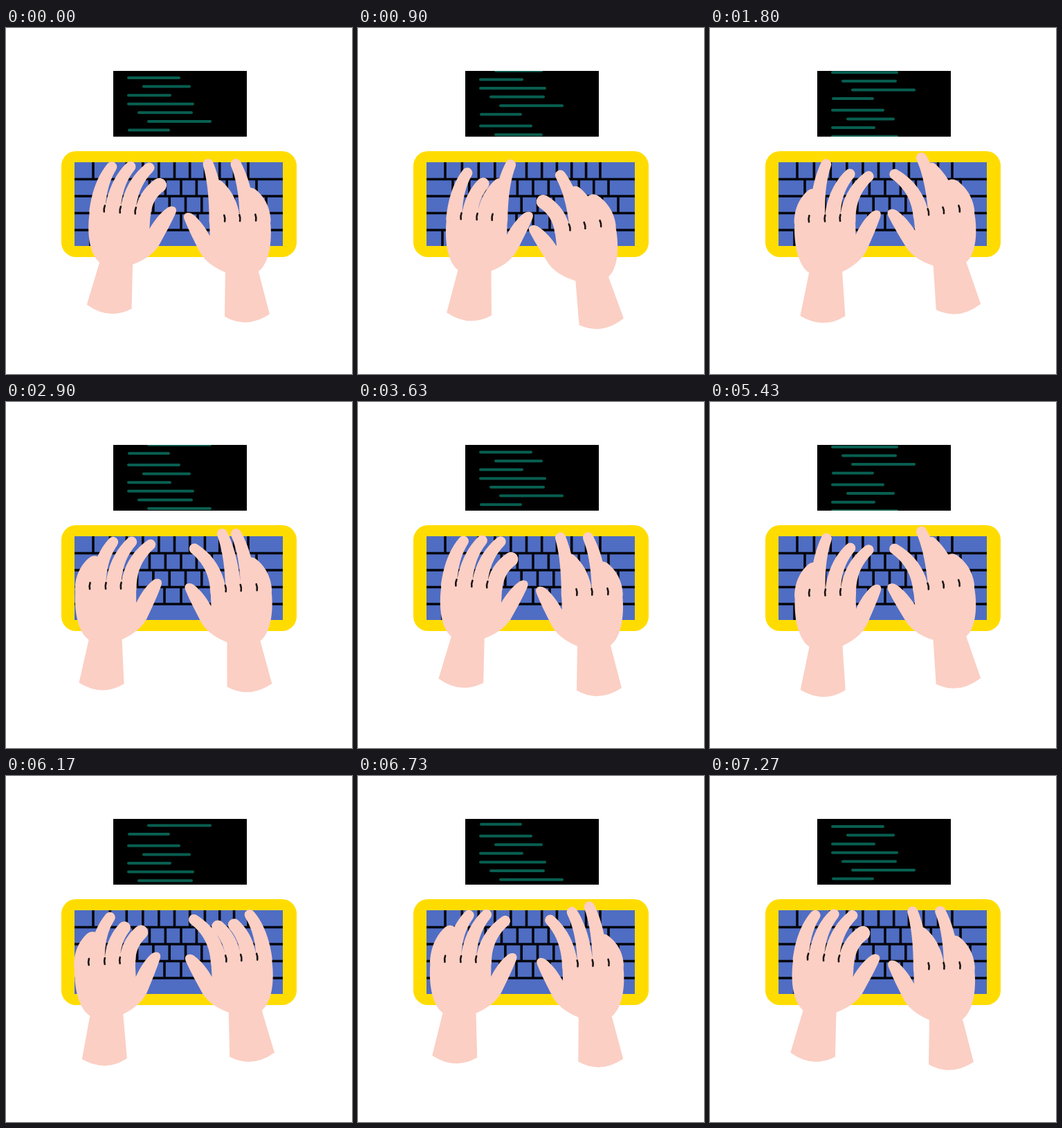
Recreate the animation shown at these times as an HTML page. Size 500 px wide and 500 px high, loop 7.31 s.

```html
<!DOCTYPE html>
<html lang="en">
<head>
<meta charset="utf-8">
<title>Typing hands</title>
<style>
  html, body { margin: 0; width: 100%; height: 100%; overflow: hidden; background: #fff; }
  svg { display: block; width: 100%; height: 100%; }
</style>
</head>
<body>
<svg id="stage" viewBox="0 0 500 500">
  <clipPath id="screen"><rect x="155" y="62" width="193" height="95"/></clipPath>
  <rect x="155" y="62" width="193" height="95"/>
  <g clip-path="url(#screen)">
    <path id="code" fill="none" stroke="#085f50" stroke-width="4" stroke-linecap="round"/>
  </g>
  <rect x="80" y="178" width="340" height="153" rx="21" fill="#ffdc00"/>
  <rect x="99" y="194" width="301" height="121" fill="#4f6dc3"/>
  <path id="gaps" fill="none" stroke="#05060c" stroke-width="3.6"/>
</svg>
<script>
const PERIOD = 3655;
const CODE_HEIGHT = 92.4;
const CODE_LINES = [[177, 250], [199, 265], [177, 237], [177, 270], [192, 268], [206, 295], [178, 235]];

// Gaps between keys per row; keys narrow slightly along a row.
const KEY_ROWS = [
  { first: 126, pitch: 24.6, narrowing: 0.22, count: 11 },
  { first: 137, pitch: 23.9, narrowing: 0.14, count: 11 },
  { first: 143, pitch: 23.3, narrowing: 0, count: 11 },
  { first: 205, pitch: 24, narrowing: 0, count: 4 },
  { first: 122, pitch: 0, narrowing: 0, count: 1 }
];

// Knuckle place, tilt, and what each finger does from pinky to index:
// "+" reaches, "-" curls, "." rests.
const BEATS = [0, 0.278, 0.492, 0.688, 0.793];
const LEFT = [
  [165, 262.5, 3.6, '+..-'], [172, 273.5, 1.4, '+--+'], [166, 275, -1.6, '.+..'],
  [142.5, 267.5, -2.8, '..--'], [144, 265.5, -0.4, '....']
];
const RIGHT = [
  [338, 274.5, 1.4, '.+-+'], [327.5, 285, 7.3, '.-+-'], [337.5, 263.5, 5.9, '..+.'],
  [340, 262.5, 3.5, '+--.'], [339.5, 268.5, 2.2, '.++.']
];
const REACH = [36, 67, 67, 63];
const LIFT = [29, 15, 16, 20];
const SKIN = '#fbcfc4';
const PALM = 'M-44 8C-46 38-40 67-25 78L-39.5 140Q-6 161 25.5 142L23 78' +
  'C43 69 55 58 61 44C67 31 74 17 80 1C84-9 75-12 68-7C58 1 50 13 44 25L44 0L-42 0Z';

const stage = document.getElementById('stage');
const code = document.getElementById('code');

function add(parent, name, attrs) {
  const node = document.createElementNS('http://www.w3.org/2000/svg', name);
  for (const key in attrs) node.setAttribute(key, attrs[key]);
  return parent.appendChild(node);
}

function makeHand(keys, side) {
  const group = add(stage, 'g', {});
  const fingers = add(group, 'path', { fill: SKIN });
  add(group, 'path', { d: PALM, fill: SKIN });
  add(group, 'path', {
    d: [-23, 0, 22].map(x => `M${x + 0.6}-4.5Q${x - 1} 0 ${x} 4.5`).join(''),
    fill: 'none', stroke: '#1a1414', 'stroke-width': 2.6, 'stroke-linecap': 'round'
  });
  const poses = keys.map(([x, y, tilt, action]) =>
    [x, y, tilt, ...[...action].map(sign => '-.+'.indexOf(sign) - 1)]);
  return { poses, side, group, fingers };
}

// Smooth cyclic interpolation through the poses.
function poseAt(poses, phase) {
  const n = BEATS.length;
  const beat = k => BEATS[(k + n) % n] + Math.floor(k / n);
  const pose = k => poses[(k + n) % n];
  let k = n - 1;
  while (BEATS[k] > phase) k--;
  const span = beat(k + 1) - beat(k);
  const u = (phase - beat(k)) / span, u2 = u * u, u3 = u2 * u;
  const slope = (j, i) => (pose(j + 1)[i] - pose(j - 1)[i]) / (beat(j + 1) - beat(j - 1)) * span;
  return pose(k).map((from, i) =>
    from * (2 * u3 - 3 * u2 + 1) + pose(k + 1)[i] * (3 * u2 - 2 * u3) +
    slope(k, i) * (u3 - 2 * u2 + u) + slope(k + 1, i) * (u3 - u2));
}

// Tapered finger that leaves the knuckle upright; short ones look fatter.
function fingerPath(level, index) {
  const bx = -33 + 22 * index, by = 4;
  const reach = REACH[index] + level * LIFT[index];
  const dx = 17 + 5 * index * (1 - 1.05 * Math.abs(level) - 0.35 * level);
  const baseR = 11.5, tipR = 7.6 + Math.max(0, 60 - reach) * 0.16;
  const bendX = 0.06, bendY = 0.62, steps = 10;
  const left = [], right = [];
  for (let i = 0; i <= steps; i++) {
    const u = i / steps, v = 1 - u;
    const x = bx + dx * (2 * v * u * bendX + u * u);
    const y = by - reach * (2 * v * u * bendY + u * u);
    const tx = dx * (v * bendX + u * (1 - bendX));
    const ty = -reach * (v * bendY + u * (1 - bendY));
    const r = (baseR + (tipR - baseR) * u) / Math.hypot(tx, ty);
    left.push(`${(x + ty * r).toFixed(2)} ${(y - tx * r).toFixed(2)}`);
    right.unshift(`${(x - ty * r).toFixed(2)} ${(y + tx * r).toFixed(2)}`);
  }
  return `M${left.join('L')}A${tipR} ${tipR} 0 0 1 ${right.join('L')}` +
         `A${baseR} ${baseR} 0 0 1 ${left[0]}Z`;
}

function drawHand({ poses, side, group, fingers }, phase) {
  const [x, y, tilt, ...levels] = poseAt(poses, phase);
  group.setAttribute('transform', `translate(${x} ${y}) scale(${side} 1) rotate(${tilt})`);
  fingers.setAttribute('d', levels.map(fingerPath).join(''));
}

function drawCode(phase) {
  const top = 72 - phase * CODE_HEIGHT;
  code.setAttribute('d', [0, CODE_HEIGHT].map(offset => CODE_LINES.map(([x1, x2], i) =>
    `M${x1} ${top + offset + 12.6 * i}H${x2}`).join('')).join(''));
}

document.getElementById('gaps').setAttribute('d', KEY_ROWS.map((row, i) => {
  const top = 194 + i * 24.5, bottom = Math.min(top + 24.5, 315);
  const lines = Array.from({ length: row.count }, (_, k) =>
    `M${row.first + row.pitch * k - row.narrowing * k * k} ${top}V${bottom}`);
  return (i ? `M99 ${top}H400` : '') + lines.join('');
}).join(''));

const hands = [makeHand(LEFT, 1), makeHand(RIGHT, -1)];
const start = performance.now();

function render(now) {
  const phase = Math.max(0, now - start) % PERIOD / PERIOD;
  drawCode(phase);
  hands.forEach(hand => drawHand(hand, phase));
  requestAnimationFrame(render);
}
render(start);
</script>
</body>
</html>
```
